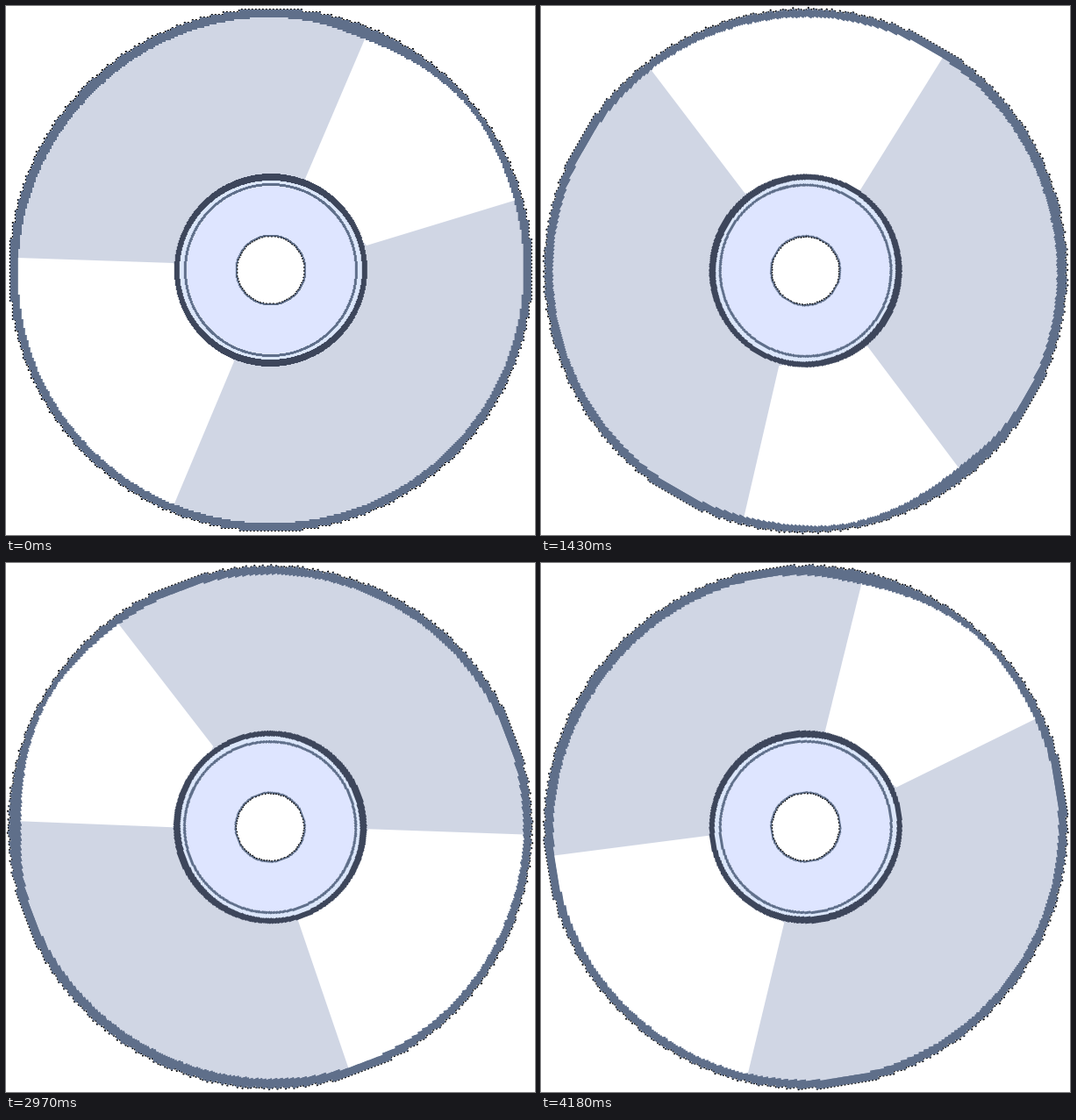
Recreate the animation shown at these times as an HTML page with a canvas. Size 603 by 603 pixels, loop 4290 ms.

```html
<!DOCTYPE html>
<html lang="en">
<head>
<meta charset="utf-8">
<title>Spinning disc</title>
<style>
  html, body { margin: 0; width: 100%; height: 100%; overflow: hidden; background: #fff; }
  canvas { display: block; }
</style>
</head>
<body>
<canvas id="stage" width="603" height="603"></canvas>
<script>
const ctx = document.getElementById('stage').getContext('2d');
const STEPS = 39, STEP_MS = 110, TAU = Math.PI * 2;
const PIVOT = [301.5, 301.3], CENTER = [301.8, 301];
const SLATE = '#5f6f8a', DARK = '#3d465b', SILVER = '#d0d6e4', LAVENDER = '#dee5ff';

// Circle whose edge is a staircase on a coarse grid
function steppedCircle(radius, grid) {
  const path = new Path2D();
  let lastY;
  for (let i = 0; i <= 1440; i++) {
    const a = i / 1440 * TAU;
    const r = typeof radius === 'function' ? radius(a) : radius;
    const x = CENTER[0] + Math.round(r * Math.cos(a) / grid) * grid;
    const y = CENTER[1] + Math.round(r * Math.sin(a) / grid) * grid;
    if (i) path.lineTo(x, lastY);
    path.lineTo(x, y);
    lastY = y;
  }
  path.closePath();
  return path;
}

function polygon(points) {
  const path = new Path2D();
  for (const [x, y] of points) path.lineTo(x, y);
  path.closePath();
  return path;
}

const bump = (a, mid, width) => Math.exp(-(((a - mid) / width) ** 2) / 2);

// The rim is thick before the narrow shine, thin along it, and a little heavier opposite
const rimInner = a =>
  288.5 - 4.5 * bump(a, 5.1, 0.16) + 3 * bump(a, 5.6, 0.15) - 2 * bump(a, 3.9, 0.4);

const rim = steppedCircle(297.6, 3);
const face = steppedCircle(rimInner, 2);
const shines = [
  polygon([[341, 197], [440, -35], [700, -60], [680, 191], [411, 273]]),
  polygon([[260, 405], [153, 660], [-80, 660], [-80, 284], [191, 293]])
];
const hub = [
  [110, DARK],
  [a => 103 + Math.cos(2 * a), '#dce7fb'],
  [99, SLATE],
  [96, LAVENDER],
  [40.5, SLATE]
].map(([r, color]) => [steppedCircle(r, 1), color]);
const hole = steppedCircle(38.3, 1);

function fill(path, color) {
  ctx.fillStyle = color;
  ctx.fill(path);
}

function dottedEdge(path, width) {
  ctx.strokeStyle = '#000';
  ctx.lineWidth = width;
  ctx.setLineDash([2, 2]);
  ctx.stroke(path);
}

function draw(now) {
  const step = Math.floor(now / STEP_MS) % STEPS;
  ctx.fillStyle = '#fff';
  ctx.fillRect(0, 0, 603, 603);
  ctx.save();
  ctx.translate(...PIVOT);
  ctx.rotate(step / STEPS * TAU);
  ctx.translate(-PIVOT[0], -PIVOT[1]);

  dottedEdge(rim, 2);
  fill(rim, SLATE);
  ctx.save();
  ctx.clip(face);
  fill(face, SILVER);
  for (const shine of shines) fill(shine, '#fff');
  ctx.restore();

  for (const [path, color] of hub) fill(path, color);
  fill(hole, '#fff');
  dottedEdge(hole, 1);
  ctx.restore();
}

const start = performance.now();
function tick() {
  draw(performance.now() - start);
  requestAnimationFrame(tick);
}
tick();
</script>
</body>
</html>
```
